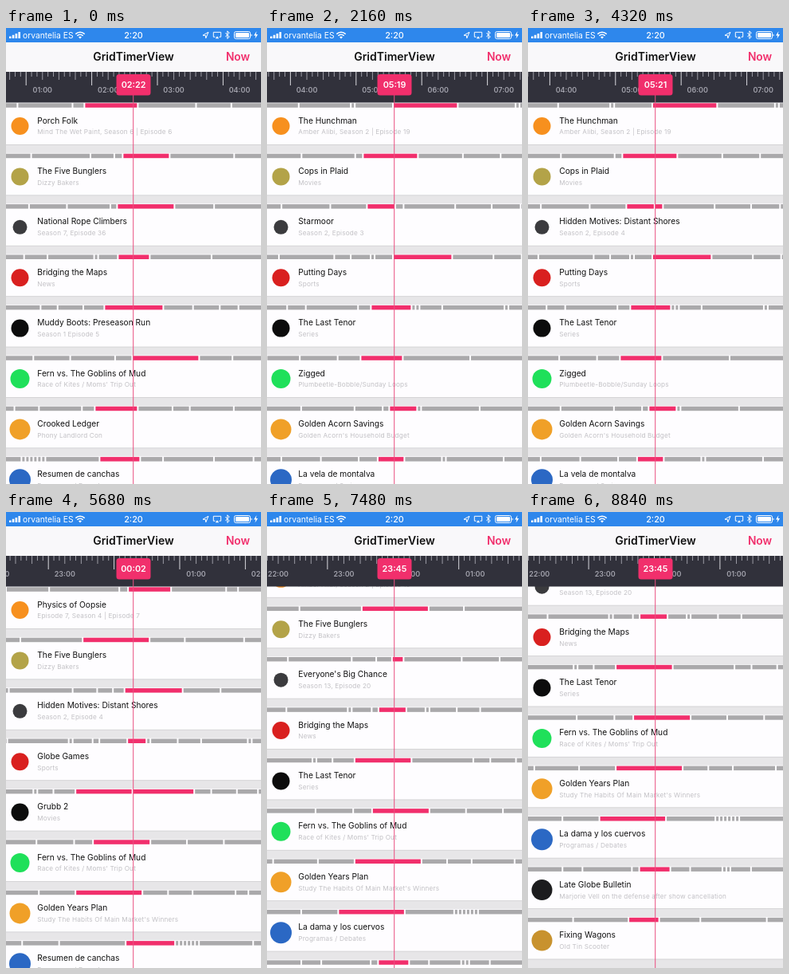
Animation, 320 px wide and 572 px high, one loop 8880 ms. Source, as an HTML page:

```html
<!DOCTYPE html>
<html lang="en">
<head>
<meta charset="utf-8">
<title>GridTimerView</title>
<style>
  html, body { margin: 0; width: 100%; height: 100%; overflow: hidden; background: #e7e6e8; }
  svg { display: block; width: 320px; height: 572px; font-family: Inter, Roboto, sans-serif; }
  .title { font-size: 10.2px; fill: #111; }
  .sub { font-size: 8.2px; fill: #c2c1c5; letter-spacing: .18px; }
  .hour { font-size: 9px; font-weight: 600; fill: #a3a3ad; text-anchor: middle; }
  .mid { text-anchor: middle; }
</style>
</head>
<body>
<svg viewBox="0 0 320 572">
  <rect width="320" height="572" fill="#e7e6e8"/>
  <g id="rows"></g>

  <rect y="55" width="320" height="38.5" fill="#31313b"/>
  <g id="ruler"></g>
  <rect x="159.2" y="84" width="1" height="488" fill="#ea4f80"/>
  <rect x="138.5" y="58" width="43" height="26.5" rx="3.5" fill="#f12f6c"/>
  <text id="clock" class="mid" x="160" y="75.3" font-size="10.8" font-weight="600" fill="#fff"></text>

  <rect y="18" width="320" height="37" fill="#f9f8fa"/>
  <text class="mid" x="160" y="41.3" font-size="14" font-weight="600" fill="#111">GridTimerView</text>
  <text class="mid" x="291" y="41.3" font-size="13.8" font-weight="600" fill="#f12f6c">Now</text>

  <rect width="320" height="18" fill="#2e87ec"/>
  <g fill="#fff">
    <path d="M4 10.5h2.6v2.5H4zM7.8 8.8h2.6V13H7.8zM11.6 7h2.6v6h-2.6zM15.4 5H18v8h-2.6z"/>
    <text x="21" y="12.6" font-size="10.3">orvantelia ES</text>
    <text class="mid" x="160" y="12.7" font-size="10.8" font-weight="500">2:20</text>
    <path d="M93 13.5l-2-2.2a3 3 0 0 1 4 0z"/>
    <rect x="288" y="6" width="17" height="6" rx="1"/>
    <path d="M307.6 7.5c1.5.3 1.5 2.7 0 3zM314.5 4l-3.5 5.5h2.3l-.8 4 3.5-5.6h-2.3z"/>
    <path d="M262.8 13.2l2.2-3 2.2 3z"/>
  </g>
  <g fill="none" stroke="#fff" stroke-width="1">
    <path d="M87.3 7.6a8.2 8.2 0 0 1 11.4 0M89.3 9.7a5.4 5.4 0 0 1 7.4 0" stroke-width="1.5"/>
    <path d="M247 9.2l7-4-3.2 7.6-.4-3.4z"/>
    <path d="M262.5 11.2h-2.2V5.3h9.4v5.9h-2.2"/>
    <path d="M275.3 6.3l5 4.7-2.5 2.4V3.8l2.5 2.4-5 4.7"/>
    <rect x="286.5" y="4.5" width="20" height="9" rx="2"/>
  </g>
</svg>
<script>
const LOOP = 8880, HOUR = 82.4, MID = 159.5, TOP = 93.5, PITCH = 63.4, LAG = 80;
const FIRST = -200, LAST = 640;
const PINK = '#f12f6c', GREY = '#aaa9ab';

// A show with its slots, each [start, end] in px from midnight.
const show = (title, sub, ...slots) => slots.map(([from, to]) => ({ from, to, title, sub }));

const channel = (color, radius, ...shows) =>
  ({ color, radius, slots: shows.flat().sort((a, b) => a.from - b.from) });

const channels = [
  channel('#f7901e', 11,
    show('The Hunchman', 'Amber Alibi, Season 2 | Episode 19', [-102, -14], [437.6, 519]),
    show('Physics of Oopsie', 'Episode 7, Season 4 | Episode 7', [-3, 51]),
    show('Porch Folk', 'Mind The Wet Paint, Season 6 | Episode 6', [135, 202])),
  channel('#b3a348', 11,
    show('The Five Bunglers', 'Dizzy Bakers', [-60, 24], [183, 242]),
    show('Cops in Plaid', 'Movies', [400, 469])),
  channel('#3b3b3e', 9,
    show("Everyone's Big Chance", 'Season 13, Episode 20', [-22, -7.5]),
    show('Hidden Motives: Distant Shores', 'Season 2, Episode 4', [-7.5, 65.5], [440.5, 451]),
    show('National Rope Climbers', 'Season 7, Episode 36', [176, 248]),
    show('Starmoor', 'Season 2, Episode 3', [405, 440.5])),
  channel('#d9201f', 11,
    show('Bridging the Maps', 'News', [-39, -4], [177, 217]),
    show('Globe Games', 'Sports', [-4, 20]),
    show('Putting Days', 'Sports', [437.6, 512])),
  channel('#0c0c0c', 11,
    show('The Last Tenor', 'Series', [-69, 2.5], [410, 461]),
    show('Grubb 2', 'Movies', [2.5, 80]),
    show('Muddy Boots: Preseason Run', 'Season 1 Episode 5', [160, 234])),
  channel('#1fe05a', 12,
    show('Fern vs. The Goblins of Mud', "Race of Kites / Moms' Trip Out", [-47, 25], [195, 279]),
    show('Zigged', 'Plumbeetle-Bobble/Sunday Loops', [397, 450])),
  channel('#f0a028', 13,
    show('Golden Years Plan', "Study The Habits Of Main Market's Winners", [-69, 15]),
    show('Crooked Ledger', 'Phony Landlord Con', [148, 202]),
    show('Golden Acorn Savings', "Golden Acorn's Household Budget", [433, 468])),
  channel('#2b68c4', 13.5,
    show('La dama y los cuervos', 'Programas / Debates', [-89.5, -6]),
    show('Resumen de canchas', 'Programas / Deportes', [-6, 56], [154, 205]),
    show('La vela de montalva', 'Programas / Series', [418.5, 452])),
  channel('#1c1c1e', 13,
    show('Late Globe Bulletin', 'Marjorie Vell on the defense after show cancellation', [-39.5, -.5])),
  channel('#c8922e', 13,
    show('Fixing Wagons', 'Old Tin Scooter', [-53, -14.5]))
];

const $ = id => document.getElementById(id);

function add(parent, tag, attrs, text) {
  const el = document.createElementNS('http://www.w3.org/2000/svg', tag);
  for (const key in attrs) el.setAttribute(key, attrs[key]);
  if (text) el.textContent = text;
  return parent.appendChild(el);
}

function put(el, key, value) {
  if (el.getAttribute(key) !== value) el.setAttribute(key, value);
}

function say(el, text) {
  if (el.textContent !== text) el.textContent = text;
}

const pad = n => String(n).padStart(2, '0');
const wrap = h => ((h % 24) + 24) % 24;

function smooth(t, from, to) {
  const u = Math.min(1, Math.max(0, (t - from) / (to - from)));
  return u * u * (3 - 2 * u);
}

let seed = 7;
function random() {
  seed = seed * 16807 % 2147483647;
  return seed / 2147483647;
}

// Random programmes for the free time between two slots.
function filler(from, to, { title, sub }) {
  const parts = [];
  while (to - from > .5) {
    const length = random() < .15 ? 5 : 20 + 65 * random();
    const end = to - from - length < 8 ? to : from + length;
    parts.push({ from, to: end, title, sub });
    from = end;
  }
  return parts;
}

function fullDay(slots) {
  const day = [];
  let end = FIRST, last = slots[0];
  for (const slot of slots) {
    day.push(...filler(end, slot.from, last), slot);
    end = slot.to;
    last = slot;
  }
  return day.concat(filler(end, LAST, last));
}

function buildRuler() {
  const ruler = $('ruler');
  for (let h = -5; h <= 10; h++) {
    for (let i = 0; i < 12; i++) {
      const height = i === 0 ? 17 : i % 3 ? 6 : 10;
      add(ruler, 'rect', {
        x: h * HOUR + (i - 3) * HOUR / 12 - .5, y: 55, width: 1, height,
        fill: i ? '#9b9ba4' : '#d8d8dd'
      });
    }
    add(ruler, 'text', { class: 'hour', x: h * HOUR, y: 81 }, pad(wrap(h)) + ':00');
  }
}

function buildRow(ch, i) {
  const row = add($('rows'), 'g', { transform: `translate(0 ${TOP + i * PITCH})` });
  add(row, 'rect', { width: 320, height: 53, fill: '#fefdff' });
  add(row, 'rect', { y: 52.5, width: 320, height: 1, fill: '#d5d4d6' });
  add(row, 'circle', { cx: 17.5, cy: 29.5, r: ch.radius, fill: ch.color });
  ch.bar = add(row, 'g', {});
  ch.day = fullDay(ch.slots);
  for (const part of ch.day) {
    part.el = add(ch.bar, 'rect', {
      x: part.from + 1, y: .8, width: part.to - part.from - 2, height: 5.5
    });
  }
  ch.title = add(row, 'text', { class: 'title', x: 39.3, y: 26 });
  ch.sub = add(row, 'text', { class: 'sub', x: 39.3, y: 39.9 });
}

// Hour under the centre line: drag ahead, slight drift, then a flick back that decays.
function hourAt(t) {
  if (t < 4200) return 2.38 + 2.949 * smooth(t, 1240, 2060) + .0795 * smooth(t, 2160, 4200);
  if (t < 4600) return 5.4085 - 1.4945 * Math.pow((t - 4200) / 400, 2.76);
  return -.238 + .279 * Math.exp((5680 - t) / 400);
}

// Vertical offset: down and up once, later a fling past the end that springs back.
function scrollAt(t) {
  if (t < 6960) return 156 * (smooth(t, 2200, 3150) - smooth(t, 3250, 4200));
  if (t < 7480) return 39 * Math.pow((t - 6960) / 520, 2);
  if (t < 7860) {
    const u = (t - 7480) / 380;
    return 39 + 139.1 * u * u * (3 - 2 * u) + 57 * u * (1 - u) * (1 - u);
  }
  return 156 + 6.5 * Math.exp((8080 - t) / 180);
}

const partAt = (day, hour) => day.find(part => part.to > hour * HOUR - 1);

function render(t) {
  const hour = hourAt(t), before = hourAt(t - LAG);
  const slide = `translate(${(MID - hour * HOUR).toFixed(2)} 0)`;
  put($('rows'), 'transform', `translate(0 ${(-scrollAt(t)).toFixed(2)})`);
  put($('ruler'), 'transform', slide);
  const minutes = Math.floor(wrap(hour) * 60);
  say($('clock'), pad(Math.floor(minutes / 60)) + ':' + pad(minutes % 60));

  // The new part lights up at once; the old one and its title leave after the lag.
  for (const { day, bar, title, sub } of channels) {
    const now = partAt(day, hour), old = partAt(day, before);
    put(bar, 'transform', slide);
    for (const part of day) put(part.el, 'fill', part === now || part === old ? PINK : GREY);
    say(title, old.title);
    say(sub, old.sub);
  }
}

function tick() {
  render(performance.now() % LOOP);
  requestAnimationFrame(tick);
}

buildRuler();
channels.forEach(buildRow);
tick();
</script>
</body>
</html>
```
